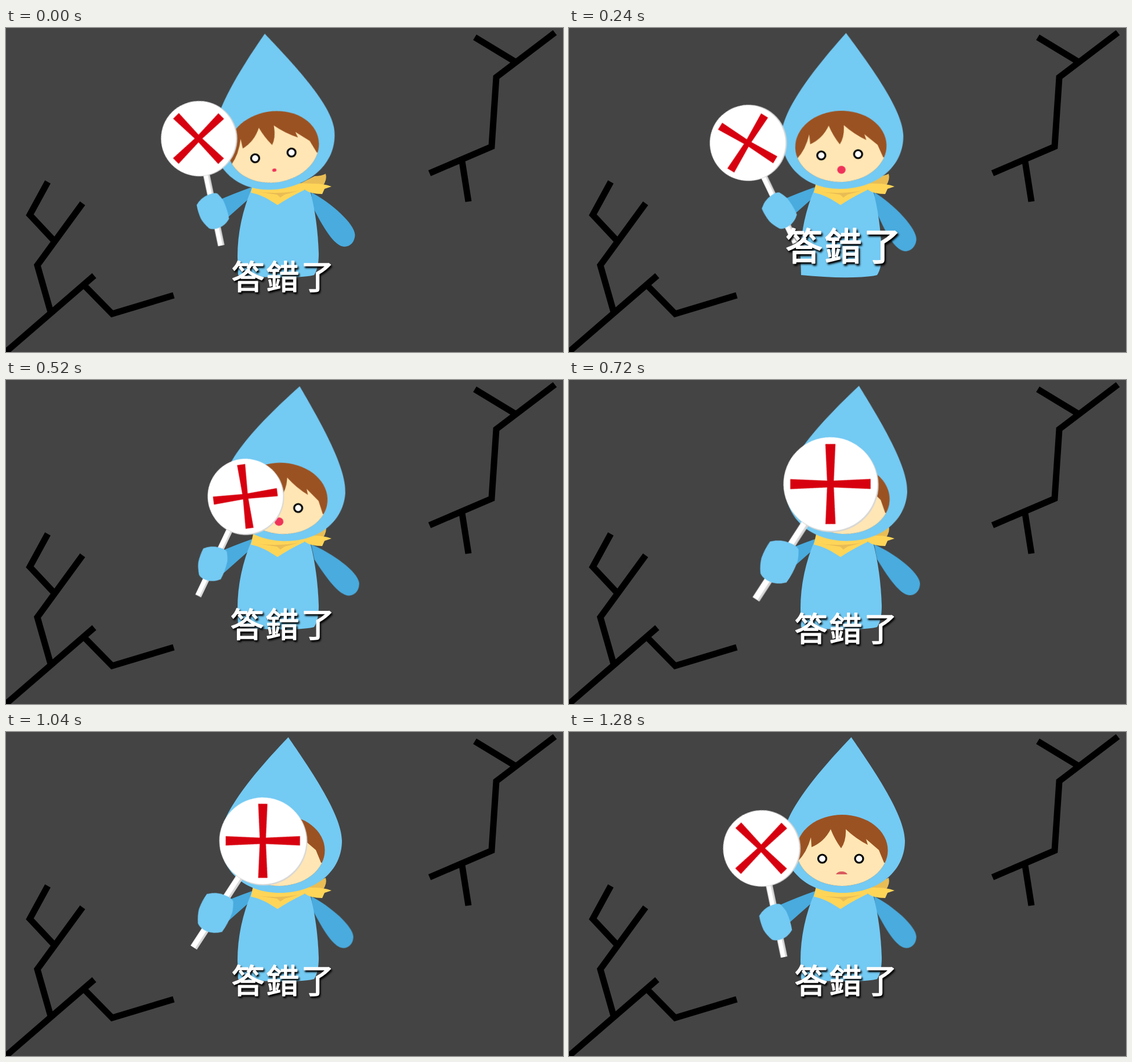
These frames come from a looping animation (960 px wide and 560 px high, 1.92 s). An HTML page:

```html
<!DOCTYPE html>
<html lang="zh-Hant">
<head>
<meta charset="utf-8">
<title>答錯了</title>
<style>
  html, body { margin: 0; width: 100%; height: 100%; overflow: hidden; background: #444; }
  svg { display: block; width: 960px; height: 560px; }

  .cracks { fill: none; stroke: #000; stroke-width: 11; }
  .light { fill: #73caf3; }
  .deep { fill: #49abde; }
  .yellow { fill: #ffd558; }
  .ochre { fill: #e9bd55; }
  .skin { fill: #ffe6b4; }
  .hair { fill: #9b5222; }
  .red { fill: #d7000f; }
  .white { fill: #fff; }
  .grey { fill: #d6d6d6; }
  .eyes { fill: #fff; stroke: #000; stroke-width: 3.2; }

  .head, .arm, .sign, .open, .flat, .caption {
    animation: 1920ms linear infinite;
  }
  .head { animation-name: nod; transform-origin: 472px 267px; }
  .arm { animation-name: swing; transform-origin: 528px 285px; }
  .sign { animation-name: wave; }
  .open { animation-name: gasp; fill: #f0325a; }
  .flat { animation-name: pout; fill: #d95b5e; }
  .caption { animation-name: hop; }
  .caption text {
    font: 400 57px "Noto Sans CJK TC", "Noto Sans CJK JP", "Noto Sans CJK", sans-serif;
    letter-spacing: 3px;
    fill: #fff; stroke: #fff; stroke-width: 1.6; stroke-linejoin: round;
    filter: drop-shadow(2.5px 3px 1.5px #000);
  }

  /* Every segment advances in 40 ms steps. */
  @keyframes nod {
    0% { transform: rotate(-9deg); animation-timing-function: steps(6); }
    12.5% { transform: rotate(-2deg); animation-timing-function: steps(8); }
    29.1667% { transform: rotate(5.3deg); animation-timing-function: steps(9); }
    47.9167%, 100% { transform: rotate(0deg); }
  }
  @keyframes swing {
    0% { transform: rotate(0deg) scale(1); animation-timing-function: steps(6); }
    12.5% { transform: rotate(4.2deg) scale(1.04); animation-timing-function: steps(8); }
    29.1667% { transform: rotate(-7deg) scale(1); animation-timing-function: steps(9); }
    47.9167%, 100% { transform: rotate(-.4deg) scale(.955); }
  }
  @keyframes wave {
    0% { transform: translate(358.4px, 316.3px) rotate(-11.8deg) scale(.985); animation-timing-function: steps(6); }
    12.5% { transform: translate(364px, 315.3px) rotate(-25.5deg) scale(.995); animation-timing-function: steps(8); }
    29.1667% { transform: translate(356.7px, 318px) rotate(32.7deg) scale(.99); animation-timing-function: steps(5); }
    39.5833% { transform: translate(365.5px, 314px) rotate(33deg) scale(1.296); }
    50% { transform: translate(365.5px, 314px) rotate(33deg) scale(1.296); animation-timing-function: steps(4); }
    58.3333% { transform: translate(358.7px, 312px) rotate(33deg) scale(.99); animation-timing-function: steps(4); }
    66.6667%, 100% { transform: translate(358px, 328.3px) rotate(-11.7deg) scale(1); }
  }
  @keyframes gasp {
    0% { transform: translate(466px, 244.5px) scale(.5, .4); animation-timing-function: steps(6); }
    12.5% { transform: translate(470.3px, 245px) scale(.98); animation-timing-function: steps(8); }
    29.1667% { transform: translate(468.6px, 245px) scale(1.04); animation-timing-function: step-end; }
    47.9167%, 100% { transform: translate(468.6px, 245px) scale(0); }
  }
  @keyframes pout {
    0% { opacity: 0; animation-timing-function: step-end; }
    47.9167%, 100% { opacity: 1; }
  }
  @keyframes hop {
    0% { transform: translate(477px, 429px) scale(1); animation-timing-function: steps(6); }
    12.5% { transform: translate(472.5px, 376.5px) scale(1.127); animation-timing-function: steps(8); }
    29.1667%, 100% { transform: translate(477px, 429px) scale(1); }
  }
</style>
</head>
<body>
<svg viewBox="0 0 960 560">
  <defs>
    <clipPath id="face"><ellipse cx="470.8" cy="204.5" rx="78.7" ry="61.5"/></clipPath>
    <path id="bar" d="M-7-56H7L4.5 0 7 56H-7L-4.5 0Z"/>
  </defs>

  <g class="cracks">
    <path d="M-5 564 152 428M77 491 54 410 132 303M84 369 41 323 72 266M134 444 183 494 289 462"/>
    <path d="M946 8 845 85 837 205 730 251M808 16 882 61M786 230 797 300"/>
  </g>

  <path class="deep" d="M424 275Q395 285 361 300 346 312 352 332 362 344 376 333L421 293Z"/>
  <path class="deep arm" d="M526 284C560 302 601 338 601.5 358 601 369 594 378 583 378 568 377 552 355 529 310Z"/>
  <path class="light" d="M424 276Q399 335 399 395L400 427Q450 432 490 431 520 430 531 427 539 415 539 390 537 330 524 280Z"/>

  <path class="ochre" d="M505 270Q520 262 532 256 543 256 551 252 554 262 546 273L520 280Z"/>
  <path class="yellow" d="M426 266 422 284.5Q438 288 452 296L468 306Q487 293 515 279.5 525 287 545 287L549 278 561 274Q548 269 530 269L500 268Z"/>
  <path class="ochre" d="M433 283Q470 288 505 281L480 288 473 293 467 288Z"/>

  <g class="head">
    <path class="light" d="M486.5 9C440 58 369 137 369 186 369 240 412 278 472 278 534 278 579 240 579 188 579 142 520 58 486.5 9Z"/>
    <g clip-path="url(#face)">
      <path class="hair" d="M380 130H560V280H380Z"/>
      <path class="skin" d="M380 224H394Q410 208 417 182L418 199Q440 190 451 168 458 186 469 201 478 188 477 168 495 185 515 195L512 185 534 204 543 226H560V280H380Z"/>
    </g>
    <g class="eyes">
      <circle cx="436.5" cy="219" r="7"/>
      <circle cx="500" cy="219" r="7"/>
    </g>
    <ellipse class="open" rx="7.4" ry="7"/>
    <path class="flat" d="M460 246Q463 241 470 241 477 241 480 246Z"/>
  </g>

  <g class="sign">
    <path class="white" d="M-5.5-72H5.5V62H-5.5Z"/>
    <path class="grey" d="M2.5-72H5.5V62H2.5Z"/>
    <circle class="grey" cx="1.4" cy="-129.4" r="66"/>
    <circle class="white" cx="-.4" cy="-130" r="65.6"/>
    <g class="red" transform="translate(-.4 -130) rotate(-33)">
      <use href="#bar"/>
      <use href="#bar" transform="rotate(90)"/>
    </g>
    <path class="light" d="M-27.4-16.6Q-17-28-3-30 7-32 12-29 18-20 20-14 24 4 23 19 13 30 1 31-9 32-14.5 28-22 18-25 9-28-4-27.4-16.6Z"/>
  </g>

  <g class="caption"><text x="1.5" y="21.5" text-anchor="middle">答錯了</text></g>
</svg>
</body>
</html>
```
